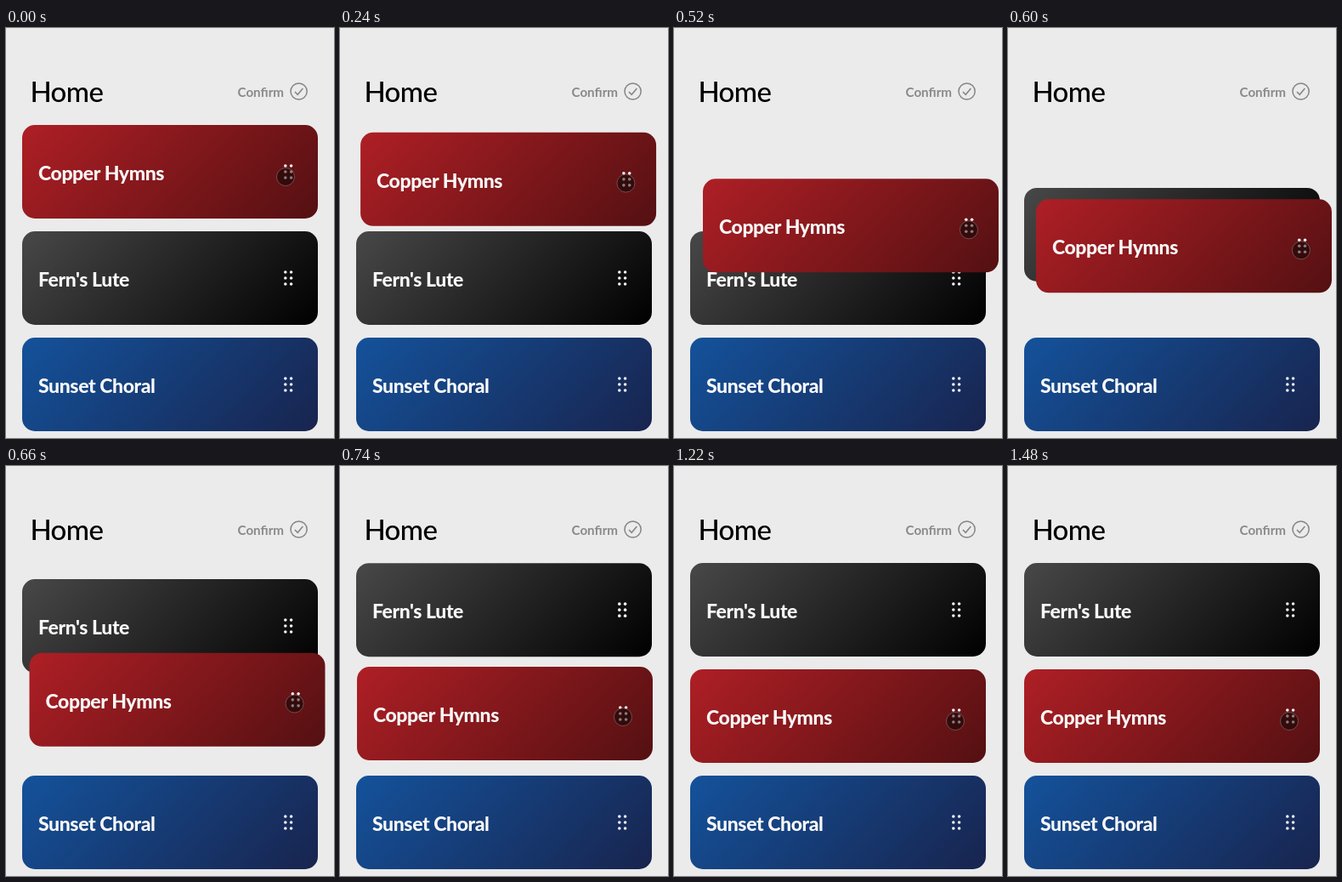
Animation, 386 px wide and 482 px high, one loop 2.5 s. Source, as an HTML page:

```html
<!DOCTYPE html>
<html lang="en">
<head>
<meta charset="utf-8">
<style>
  html, body { margin: 0; width: 100%; height: 100%; overflow: hidden; background: #ebebeb; }
  svg { display: block; width: 386px; height: 482px; font-family: Lato, sans-serif; }
  .title { font-size: 33px; font-weight: 500; letter-spacing: -.6px; }
  .label { font-size: 23px; font-weight: 800; letter-spacing: -.4px; fill: #f8f8f8; }
</style>
</head>
<body>
<svg id="stage" viewBox="0 0 386 482">
  <text class="title" x="28.4" y="87">Home</text>
  <text x="272.5" y="80.5" font-size="15.2" font-weight="700" fill="#8a8a8a">Confirm</text>
  <g fill="none" stroke="#858585" stroke-width="1.5">
    <circle cx="344.6" cy="74.5" r="9.6"/>
    <path d="M340 75l3.2 3.3 6.2-7.3"/>
  </g>
</svg>
<script>
const stage = document.getElementById('stage');

function addCard(id, title, from, to) {
  let dots = '';
  for (const x of [309.8, 316.6])
    for (const y of [48, 55, 62]) dots += `<circle cx="${x}" cy="${y}" r="1.8"/>`;
  stage.insertAdjacentHTML('beforeend', `
    <linearGradient id="${id}-fill" gradientUnits="userSpaceOnUse" x1="59.5" y1="-59.5" x2="288.5" y2="169.5">
      <stop stop-color="${from}"/><stop offset="1" stop-color="${to}"/>
    </linearGradient>
    <g id="${id}">
      <rect width="348" height="110" rx="15" fill="url(#${id}-fill)"/>
      <text class="label" x="19" y="65">${title}</text>
      <g fill="#f2f2f2">${dots}</g>
    </g>`);
  return document.getElementById(id);
}

const blue = addCard('blue', 'Sunset Choral', '#14529b', '#18244e');
const black = addCard('black', "Fern's Lute", '#484848', '#000');
const red = addCard('red', 'Copper Hymns', '#ae1f25', '#541012');
stage.insertAdjacentHTML('beforeend',
  '<circle id="touch" r="10.5" fill="#000" fill-opacity=".47" stroke="#999" stroke-opacity=".45"/>');
const touch = document.getElementById('touch');

const clamp = v => Math.min(1, Math.max(0, v));
const place = (el, x, y) => el.setAttribute('transform', `translate(${x} ${y})`);

// CSS "ease": cubic-bezier(.25, .1, .25, 1)
function ease(x) {
  let lo = 0, hi = 1, s;
  for (let i = 0; i < 20; i++) {
    s = (lo + hi) / 2;
    if (.75 * s * (1 - s) + s ** 3 < x) lo = s; else hi = s;
  }
  return .3 * s * (1 - s) ** 2 + 3 * s * s * (1 - s) + s ** 3;
}

// Monotone cubic through the values v at the given times
function curve(times, v) {
  const slope = times.slice(1).map((t, i) => (v[i + 1] - v[i]) / (t - times[i]));
  const tangent = times.map((_, i) => {
    const a = slope[i - 1], b = slope[i];
    return a * b > 0 ? 2 * a * b / (a + b) : 0;
  });
  return t => {
    if (t >= times.at(-1)) return v.at(-1);
    const i = times.findIndex(k => k > t) - 1;
    const h = times[i + 1] - times[i], s = (t - times[i]) / h, r = 1 - s;
    return v[i] * (1 + 2 * s) * r * r + v[i + 1] * s * s * (3 - 2 * s)
      + h * s * r * (tangent[i] * r - tangent[i + 1] * s);
  };
}

const times = [0, 360, 520, 600, 740, 1020];
const cardX = curve(times, [19, 28, 34, 33, 20, 18]);
const cardY = curve(times, [114, 132, 177, 201, 236, 242]);
const touchX = curve(times, [329, 341.5, 347, 345, 333, 331]);
const touchY = curve(times, [175, 190.5, 237, 261, 295, 300]);

function draw(now) {
  const t = now % 2500;
  const drop = ease(clamp((t - 1040) / 200));
  const swap = ease(clamp((t - 551) / 200));
  place(blue, 19, 364);
  place(black, 19, 239 - 125 * swap);
  place(red, cardX(t) + drop, cardY(t) - 3 * drop);
  place(touch, touchX(t), touchY(t));
  requestAnimationFrame(draw);
}
draw(0);
</script>
</body>
</html>
```
